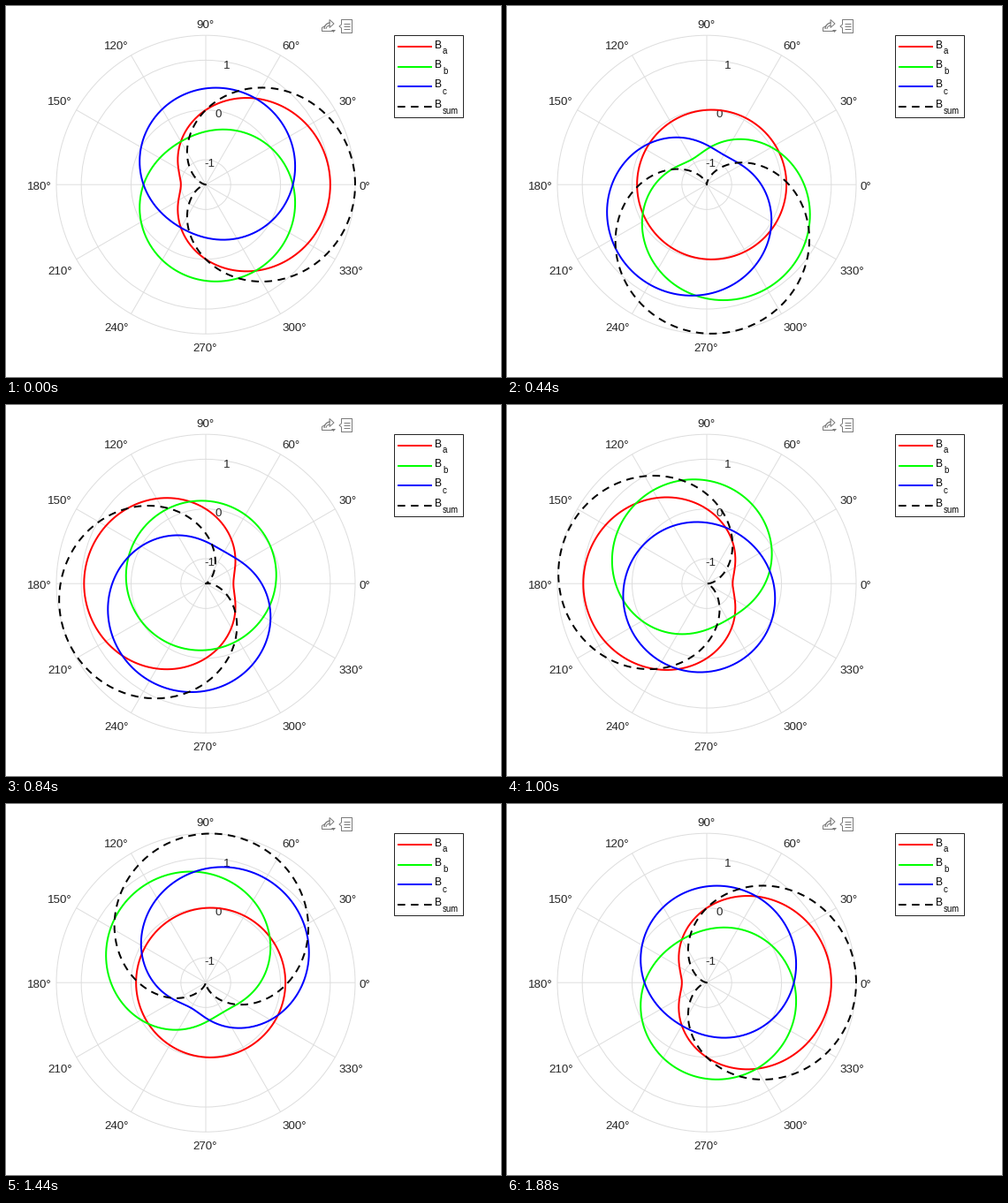
A matplotlib script for the animation above (1.92 s loop, 560x420 px).

```python
import numpy as np
import matplotlib.pyplot as plt
from matplotlib.animation import FuncAnimation
from matplotlib.patches import Circle, Polygon, Rectangle

W, H, DPI = 560, 420, 100
PX = 72 / DPI                     # points per pixel
FRAMES, INTERVAL = 48, 40
CX, CY, RADIUS = 226, 202.2, 169
R_MAX = 1.5
DARK, GRID, ICON = "#262626", "#dedede", "#7c7c7c"
DASH = (0, (4.3, 3.2))            # in line widths

plt.rcParams["font.family"] = "Liberation Sans"
fig = plt.figure(figsize=(W / DPI, H / DPI), dpi=DPI, facecolor="white")
ax = fig.add_axes([0, 0, 1, 1])
ax.set_xlim(0, W)
ax.set_ylim(H, 0)
ax.axis("off")


def polar(angle, r):
    """Pixel position of value r, where -R_MAX is the centre."""
    d = (r + R_MAX) / (2 * R_MAX) * RADIUS
    return CX + d * np.cos(angle), CY - d * np.sin(angle)


def line(x, y, color, width=1, z=1, **kw):
    kw.setdefault("solid_capstyle", "butt")
    return ax.plot(x, y, color=color, lw=width * PX, zorder=z, **kw)[0]


def label(x, y, text, size=13.33, ha="left", color=DARK, z=2):
    ax.text(x, y, text, fontsize=size * PX, ha=ha, va="baseline",
            color=color, zorder=z)


def draw_grid():
    for r in (-1, 0, 1, R_MAX):
        d = (r + R_MAX) / (2 * R_MAX) * RADIUS
        ax.add_patch(Circle((CX, CY), d, fill=False, ec=GRID, lw=PX))
    for deg in range(0, 360, 30):
        a = np.radians(deg)
        c, s = np.round((np.cos(a), np.sin(a)), 6)
        line([CX, CX + RADIUS * c], [CY, CY - RADIUS * s], GRID, snap=False)
        drop = 6 if s == 0 else -3 if s > 0 else 15
        ha = "center" if c == 0 else "left" if c > 0 else "right"
        label(CX - .5 + 174 * c, round(CY - 174 * s + drop), f"{deg}°", ha=ha)
    for r in (-1, 0, 1):
        x, y = polar(np.radians(80), r)
        label(x - .5, y + 7.2, str(r), ha="center")


def draw_legend(entries):
    ax.add_patch(Rectangle((438.5, 32.5), 78, 93, fc="white", ec=DARK,
                           lw=PX, zorder=5))
    for i, (sub, color, style) in enumerate(entries):
        y = 46 + 22.5 * i
        line([443, 482], [y, y], color, 2, 6, ls=style, dash_capstyle="butt")
        label(485, y + 1.5, "B", 12, color="black", z=6)
        label(494, y + 8.5, sub, 9.6, color="black", z=6)


def draw_icons():
    # export arrow with tray and drop-down mark
    line([361, 357.5, 357.5, 370], [22.5, 24.5, 28.5, 28.5], ICON)
    t = np.linspace(0, np.pi / 2, 12)
    line(367 - 7 * np.cos(t), 26 - 7 * np.sin(t), ICON, 1.3)
    line(367 - 5 * np.cos(t), 26 - 4 * np.sin(t), ICON)
    ax.add_patch(Polygon([(366, 15.5), (371, 20), (366, 24.5)], fill=False,
                         ec=ICON, lw=PX))
    ax.add_patch(Polygon([(368, 27), (373, 27), (370.5, 30)], fc=ICON, lw=0))
    # data tip
    line([379.5, 379.5, 391.5, 391.5, 379.5, 379.5, 377, 379.5],
         [21, 15.5, 15.5, 30.5, 30.5, 25, 23, 21], ICON)
    for y in (19.5, 22.5, 25.5):
        line([382, 389], [y, y], ICON)


series = [("a", "#ff0000", "-"), ("b", "#00ff00", "-"),
          ("c", "#0000ff", "-"), ("sum", "black", DASH)]
draw_grid()
draw_legend(series)
draw_icons()
curves = [line([], [], color, 2, 3, ls=style, dash_capstyle="butt")
          for _, color, style in series]

theta = np.linspace(0, 2 * np.pi, 361)
shifts = np.radians([0, 120, -120])


def update(frame):
    phase = 2 * np.pi * frame / (FRAMES - 1)
    fields = [np.cos(phase + s) * np.cos(theta - s) for s in shifts]
    fields.append(sum(fields))
    for curve, field in zip(curves, fields):
        curve.set_data(*polar(theta, field))
    return curves


anim = FuncAnimation(fig, update, frames=FRAMES, interval=INTERVAL,
                     repeat=True, repeat_delay=0)
plt.show()
```
